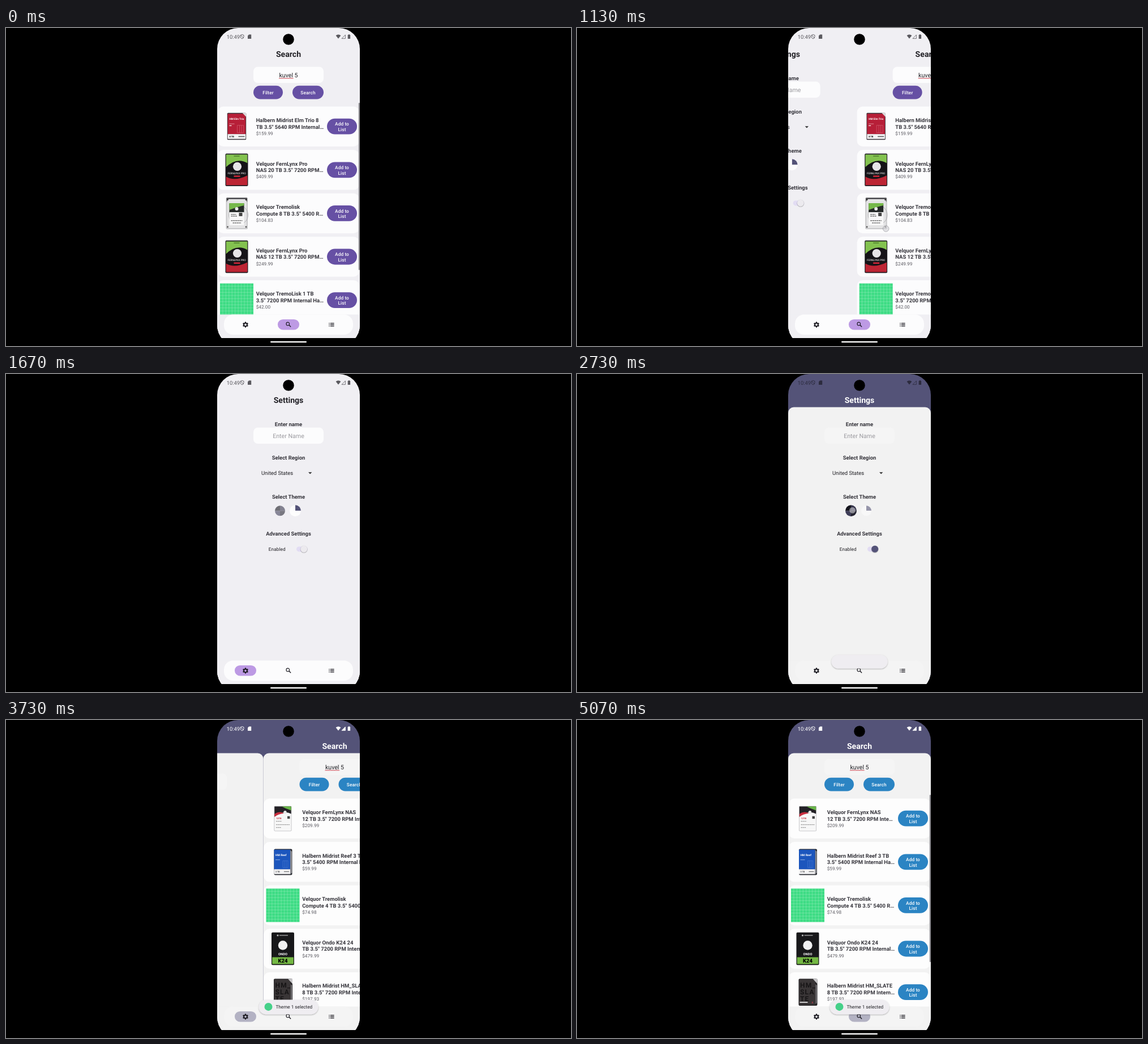
These frames come from a looping animation (998 by 561 pixels, 5.1 s). An HTML page:

```html
<!DOCTYPE html>
<html lang="en">
<head>
<meta charset="utf-8">
<title>Part list app</title>
<style>
html, body { margin: 0; width: 100%; height: 100%; overflow: hidden; background: #000; }
svg {
  display: block; width: 100vw; height: 100vh;
  font-family: Roboto, Arial, sans-serif; text-rendering: geometricPrecision;
  --bg: #f0eff3; --head: #f0eff3; --title: #232227; --field: #fcfcfd; --card: #fcfcfd;
  --accent: #6650a4; --pill: #bd9ae4; --nav: #fcfcfd; --thumb: #eceaee;
}
svg.alt {
  --bg: #f2f2f2; --head: #545378; --title: #fff; --field: #f5f5f5; --card: #fdfdfd;
  --accent: #2b84c3; --pill: #b3b2c3; --nav: #f4f4f4; --thumb: #545378;
}
.mid { text-anchor: middle; }
.title { font-weight: 700; fill: var(--title); }
.bold { font-weight: 700; fill: #35343b; }
.ink { fill: #1f1e23; }
.price { fill: #5d5c63; }
.hint { fill: #9b9a9f; }
.btn { font-weight: 500; fill: #fff; letter-spacing: .1px; }
.icon { fill: none; stroke: #1c1b22; }
.pie { transform: scale(.9); opacity: .58; }
svg:not(.alt) .pie.light, svg.alt .pie.dark { transform: none; opacity: 1; }
svg:not(.alt) .altOnly, svg.alt .baseOnly { display: none; }
</style>
</head>
<body>
<svg id="stage" viewBox="0 0 998 561"></svg>
<script>
const LOOP = 5100, PAGE = 252, THEME_AT = 2700;
const stage = document.getElementById('stage');

// markup helpers
const text = (x, y, str, size, cls, extra = '') =>
  `<text x="${x}" y="${y}" font-size="${size}" class="${cls}" ${extra}>${str}</text>`;
const rect = (x, y, w, h, r, fill, extra = '') =>
  `<rect x="${x}" y="${y}" width="${w}" height="${h}" rx="${r}" fill="${fill}" ${extra}/>`;
const disc = (x, y, r, fill, extra = '') =>
  `<circle cx="${x}" cy="${y}" r="${r}" fill="${fill}" ${extra}/>`;
const path = (d, fill, extra = '') => `<path d="${d}" fill="${fill}" ${extra}/>`;
const group = (x, y, body, extra = '') => `<g transform="translate(${x} ${y})" ${extra}>${body}</g>`;
const white = 'fill="#fff"';

// product pictures, drawn around their centre
const grid = () => {
  let d = '';
  for (let p = -24.6; p < 29; p += 5.46) d += `M${p} -29.5v59M-29.5 ${p}h59`;
  return rect(-29.5, -29.5, 59, 59, 0, '#3ddc84') +
    path(d, 'none', 'stroke="#fff" stroke-opacity=".42" stroke-width=".5"');
};
const redDrive = () =>
  rect(-16.7, -24, 33.4, 47.5, 1.5, '#39343a') +
  rect(-15.8, -22.5, 31.6, 36, .5, '#b71f38') +
  rect(-15.8, 13.5, 31.6, 8.5, 0, '#f4f3f4') +
  path('M10 -24h6.7v7z', '#ddd') +
  text(-13, -11.5, 'HM Elm Trio', 4.7, '', white + ' font-weight="700"') +
  rect(-13, -5, 9, .8, 0, '#e7a5ae') + rect(-13, -2, 4, 1.2, 0, '#fff') +
  path('M1 -2h11v13h-11zM5 -2v13M8.5 -2v13', 'none', 'stroke="#d86b7b" stroke-width=".6"') +
  text(-13, 19.5, '8 TB', 4, '', 'font-weight="700"') + rect(3, 17, 11, 1.5, 0, '#555');
const lynxDrive = () =>
  rect(-20, -28.7, 40, 57.5, 2, '#26252a') +
  rect(-18.8, -27, 37.6, 54, 1, '#151317') +
  path('M-18.8 -27h37.6v15Q0 -23 -18.8 -5z', '#83c24f') +
  path('M-18.8 12Q-4 21 18.8 10v17h-37.6z', '#bd2534') +
  rect(-5, -25, 10, 1.4, 0, '#4a792b') +
  disc(1, -6, 7.6, '#e6e4e7') +
  text(0, 7.5, 'FERNLYNX PRO', 4.6, 'mid', white) +
  rect(-5, 10, 11, 2.4, 0, '#d9273a');
const silverDrive = () =>
  rect(-19, -28, 38.5, 56, 2, '#c9c9cb') +
  rect(-18, -27.5, 36.5, 7, 1, '#4c4c50') +
  rect(-17, -25, 34.5, 51, 3, '#e4e4e5') +
  disc(3, 3, 17, 'none', 'stroke="#a5a5a8" stroke-width=".8"') +
  rect(-13, -18, 26, 17, 1, '#242827') +
  path('M-13 -18h26v4Q3 -12 -13 -6z', '#75b84a') +
  disc(0, -8, 3, '#e9e9e9') +
  rect(-13, -2, 26, 23, 0, '#f8f8f8') + rect(4, -1, 6, 6, 0, '#444') +
  path('M-10 2h9M-10 5h11M-10 13h20M-7 17h15', 'none', 'stroke="#555" stroke-width="1.2" stroke-dasharray="3 .7"') +
  [-16, 16.5].map(x => disc(x, -24, 1.4, '#333') + disc(x, 24, 1.4, '#555')).join('');
const nasDrive = () =>
  rect(-15.5, -22, 31, 44.5, 2, '#bdbdc0') + rect(-14.7, -21.3, 29.4, 43, 1, '#f7f7f7') +
  path('M-14.7 -21.3h29.4v13Q0 -15 -14.7 -3z', '#232126') +
  path('M-2 -21.3h16.7v7Q6 -17 -2 -21.3z', '#69b748') +
  path('M-14.7 -8Q-6 -14 2 -9Q-8 -8 -14.7 -3z', '#c92d3e') +
  disc(4, -11, 2.7, '#e8e8e8') +
  text(-12, 1, '12TB', 4, '', 'fill="#c32b3b" font-weight="700"') +
  rect(8, -4, 4.5, 4.5, 0, '#444') +
  path('M-12 5h10M-12 11h24M-12 16h9', 'none', 'stroke="#888" stroke-width="1" stroke-dasharray="2.5 .6"');
const blueDrive = () =>
  rect(-15.5, -22.7, 32, 46, 2, '#2b2d33') +
  path('M13 -21l3 3v37l-3 3z', '#88898e') +
  rect(-15.5, -21.5, 28.5, 35, .5, '#1c56bd') +
  rect(-15.5, 13, 28.5, 8.5, 0, '#f2f2f3') +
  text(-13, -10, 'HM Reef', 5, '', white + ' font-weight="700"') +
  rect(-13, -4, 8, .8, 0, '#a9c0ea') +
  path('M0 -2h9v12h-9zM3 -2v12M6 -2v12', 'none', 'stroke="#4c7dd3" stroke-width=".6"') +
  text(-13, 19, '3 TB', 3.8, '') + rect(2, 16.5, 9, 1.3, 0, '#777');
const ondoDrive = () =>
  rect(-20, -28.7, 40, 57.5, 2, '#18181a') +
  path('M-18.8 15h37.6v12h-37.6z', '#74b843') +
  disc(-9, -23.5, 1.6, '#bbb') + rect(-6, -24.2, 15, 1.3, 0, '#aaa') +
  disc(0, -6, 8.2, '#f1f1f1') +
  text(0, 11, 'ONDO', 5.8, 'mid', white + ' font-weight="700"') +
  text(0, 24.5, 'K24', 9.5, 'mid', 'font-weight="900"');
const slateDrive = () =>
  rect(-16, -23.5, 33, 47.5, 2, '#232123') + rect(-15, -22.5, 28.5, 45, 1, '#393536') +
  path('M9 -23.5h8v9z', '#c8c7c9') + path('M14 -14l2 2v31l-2 2z', '#7f7d80') +
  ['HM_', 'SLA', 'TE'].map((s, i) =>
    text(-13.5, -8 + i * 12, s, 12, '', 'fill="#171516" font-weight="700" letter-spacing="1.2"')).join('') +
  rect(-14, 17, 14, 1.8, 0, '#ddd') + text(7, 20, '8', 4.5, '', 'fill="#e0455a"');

const baseItems = [
  ['Halbern Midrist Elm Trio 8', 'TB 3.5" 5640 RPM Internal…', '$159.99', redDrive],
  ['Velquor FernLynx Pro', 'NAS 20 TB 3.5" 7200 RPM…', '$409.99', lynxDrive],
  ['Velquor Tremolisk', 'Compute 8 TB 3.5" 5400 R…', '$104.83', silverDrive],
  ['Velquor FernLynx Pro', 'NAS 12 TB 3.5" 7200 RPM…', '$249.99', lynxDrive],
  ['Velquor TremoLisk 1 TB', '3.5" 7200 RPM Internal Ha…', '$42.00', grid],
];
const altItems = [
  ['Velquor FernLynx NAS', '12 TB 3.5" 7200 RPM Inte…', '$209.99', nasDrive],
  ['Halbern Midrist Reef 3 TB', '3.5" 5400 RPM Internal Ha…', '$59.99', blueDrive],
  ['Velquor Tremolisk', 'Compute 4 TB 3.5" 5400 R…', '$74.98', grid],
  ['Velquor Ondo K24 24', 'TB 3.5" 7200 RPM Internal…', '$479.99', ondoDrive, true],
  ['Halbern Midrist HM_SLATE', '8 TB 3.5" 7200 RPM Intern…', '$197.93', slateDrive, true],
];

const card = ([line1, line2, price, picture, late], i) => group(0, 138.5 + 76.6 * i,
  rect(374, 0, 250, 70.5, 10, 'var(--card)') +
  group(407.5, 35.2, picture()) +
  (late ? group(407.5, 35.2, grid(), 'class="late"') : '') +
  text(441.7, 27.6, line1, 9.45, 'bold') + text(441.7, 39, line2, 9.45, 'bold') +
  text(441.7, 50.3, price, 8.27, 'price') +
  rect(567, 21.3, 53, 27.8, 13.9, 'var(--accent)') +
  text(593.5, 33.9, 'Add to', 8.27, 'btn mid') + text(593.5, 43.5, 'List', 8.27, 'btn mid'));

const panel = path('M373 68.5a10 10 0 0 1 10-10h232a10 10 0 0 1 10 10V561H373z', 'var(--bg)');
const field = y => rect(437, y, 124, 28.5, 8, 'var(--field)');
const button = (x, w, label) =>
  rect(x, 101.8, w, 23.6, 11.8, 'var(--accent)') + text(x + w / 2, 116.7, label, 8.27, 'btn mid');

const searchPage = panel +
  text(499, 50.8, 'Search', 14.1, 'title mid') + field(68.5) +
  text(499, 87.3, 'kuvel 5', 10.63, 'ink mid') + rect(482, 88.3, 25.6, 1, 0, '#c9404c') +
  button(437, 52, 'Filter') + button(506, 55, 'Search') +
  `<g class="baseOnly">${baseItems.map(card).join('')}</g>` +
  `<g class="altOnly">${altItems.map(card).join('')}</g>` +
  rect(622.7, 132, 2.3, 295, 1, '#8f8e93');

const pie = (x, cls, colors) => group(x, 241.3, `<g class="pie ${cls}">` + colors.map((c, i) =>
  path('M0 0V-10A10 10 0 0 1 10 0Z', c, `transform="rotate(${90 * i})"`)).join('') + '</g>');

const settingsPage = panel +
  text(499, 50.8, 'Settings', 14.1, 'title mid') +
  text(499, 91.6, 'Enter name', 9.45, 'bold mid') + field(94.5) +
  text(499, 113, 'Enter Name', 10.63, 'hint mid') +
  text(499, 150.5, 'Select Region', 9.45, 'bold mid') +
  text(451, 178.2, 'United States', 9.45, 'ink') +
  path('M534 173.3h6.4l-3.2 3.2z', '#333') +
  text(499, 220, 'Select Theme', 9.45, 'bold mid') +
  pie(484, 'dark', ['#35344c', '#23222f', '#3f3e58', '#14141c']) +
  pie(511, 'light', ['#545378', '#fdfdfd', '#fdfdfd', '#fdfdfd']) +
  text(499, 284.6, 'Advanced Settings', 9.45, 'bold mid') +
  text(463.7, 311.8, 'Enabled', 8.27, 'ink', 'letter-spacing=".1"') +
  rect(513, 304.4, 19.5, 9, 4.5, '#e2dcf3') +
  disc(526.2, 309.3, 6.5, '#000', 'opacity=".22"') + disc(526.2, 308.7, 6, 'var(--thumb)');

const statusBar = `<g id="status">` +
  text(389.8, 18.5, '10:49', 9.4, '') +
  path('M417 11.6l3 1.1v2.4q0 2.7-3 3.9q-3-1.2-3-3.9v-2.4zM414.4 12.4l5.2 5.6', 'none', 'stroke="currentColor" stroke-width=".9"') +
  path('M429.2 11.5h4v7.5h-6.2v-5.2z', 'currentColor') +
  path('M582.6 13.2Q587 9.7 591.4 13.2L587 18.8z', 'currentColor') +
  path('M593 18.6h6.4v-6.6z', 'none', 'id="signal" stroke="currentColor" stroke-width=".8"') +
  path('M605 11.3h1.8v.8h1.3v7h-4.4v-7h1.3z', 'currentColor') + '</g>';

const pill = (x, id) => group(x, 523.2, rect(-19, -9.3, 38, 18.6, 9.3, 'var(--pill)', `id="${id}"`));
const navBar = rect(373, 505.5, PAGE, 56, 0, 'var(--bg)') +
  rect(385, 505.5, 228, 35.5, 16, 'var(--nav)') +
  pill(423, 'gearPill') + pill(499, 'searchPill') +
  group(423, 523.4, '<circle r="2.9" stroke-width="2.1"/>' +
    '<circle r="4.2" stroke-width="1.7" pathLength="12" stroke-dasharray="1 1" stroke-dashoffset="-.5"/>', 'class="icon"') +
  group(499, 523, '<circle cx="-1.2" cy="-1.1" r="2.8" stroke-width="1.1"/><path d="M.9 1l3.2 3.2" stroke-width="1.4"/>', 'class="icon"') +
  group(575, 523.3, '<path d="M-4.7 -2.5h1.3M-4.7 0h1.3M-4.7 2.5h1.3M-2.2 -2.5h6.8M-2.2 0h6.8M-2.2 2.5h6.8" stroke-width="1.2"/>', 'class="icon"');

const toast = group(499, 506.4, '<g id="toast">' +
  rect(-52.4, -12.8, 104.8, 25.6, 12.8, '#efedf1', 'filter="url(#shadow)"') +
  '<g id="toastBody">' + disc(-35.5, -.5, 7, '#45d089') +
  text(-22.6, 2.6, 'Theme 1 selected', 8.2, 'ink') + '</g></g>');

stage.innerHTML = `<defs>
  <clipPath id="screen"><rect x="373" y="0" width="252" height="561" rx="37"/></clipPath>
  <filter id="shadow" x="-10%" y="-30%" width="120%" height="170%">
    <feDropShadow dx="0" dy="1" stdDeviation="1.1" flood-opacity=".32"/></filter></defs>` +
  rect(0, 0, 998, 561, 0, '#000') +
  '<g clip-path="url(#screen)">' + rect(373, 0, PAGE, 561, 0, 'var(--head)') +
  `<g id="settings">${settingsPage}</g><g id="search">${searchPage}</g>` +
  navBar + statusBar + toast + '</g>' +
  rect(373, 547, PAGE, 14, 0, '#000') + rect(467, 552.4, 64, 2.6, 1.3, '#f4f4f4') +
  disc(499, 20, 9.8, '#000') +
  disc(0, 0, 5.3, '#d2d2d7', 'id="touch" fill-opacity=".6" stroke="#77777c" stroke-opacity=".6" stroke-width=".8"');

const el = {};
stage.querySelectorAll('[id]').forEach(n => el[n.id] = n);
const late = stage.querySelectorAll('.late');

// motion
const ramp = (t, a, b) => Math.min(1, Math.max(0, (t - a) / (b - a)));
const easeOut = u => 1 - (1 - u) ** 2;
const along = (t, points) => {
  let v = points[0][1];
  for (let i = 1; i < points.length; i++) {
    const [a, from] = points[i - 1], [b, to] = points[i];
    if (t >= a) v = from + (to - from) * ramp(t, a, b);
  }
  return v;
};
const firstDrag = [[570, 0], [800, 18], [1000, 56], [1070, 82], [1130, 120], [1160, 140]];
const secondDrag = [[3500, 0], [3540, 2], [3570, 9.5], [3600, 30], [3640, 70]];

// how far the search page sits to the right of its resting place
function pageShift(t) {
  if (t < 1160) return along(t, firstDrag);
  if (t < 3500) return 140 + (PAGE - 140) * easeOut(ramp(t, 1160, 1460));
  if (t < 3640) return PAGE - along(t, secondDrag);
  return (PAGE - 70) * (1 - easeOut(ramp(t, 3640, 3915)));
}

function touchPoint(t, shift) {
  if (t >= 570 && t < 1180) return [425 + shift, 354];
  if (t >= 2570 && t < 2770) return [486.5, 240.5];
  if (t >= 3480 && t < 3645) return [520.5 - (PAGE - shift), 279];
  return null;
}

function setPill(node, k) {
  node.setAttribute('opacity', k);
  node.setAttribute('transform', `scale(${.4 + .6 * easeOut(k)} 1)`);
}

function draw(t) {
  const alt = t >= THEME_AT, shift = pageShift(t);
  stage.classList.toggle('alt', alt);
  el.search.setAttribute('transform', `translate(${shift} 0)`);
  el.settings.setAttribute('transform', `translate(${shift - PAGE} 0)`);
  late.forEach(n => n.setAttribute('opacity', t < 3690 ? 1 : 0));

  const fade = ramp(t, 2740, 2900);
  const tint = alt ? `rgb(${[44, 43, 62].map(c => c + (255 - c) * fade)})` : '#5a595e';
  el.status.setAttribute('color', tint);
  el.status.setAttribute('fill', tint);
  el.signal.setAttribute('fill', t >= 3600 ? 'currentColor' : 'none');

  setPill(el.gearPill, t < THEME_AT ? ramp(t, 1460, 1600)
    : t < 3915 ? ramp(t, 2760, 2900) : 1 - ramp(t, 3915, 4000));
  setPill(el.searchPill, t < THEME_AT ? 1 - ramp(t, 1460, 1540) : ramp(t, 3915, 4055));

  const rise = ramp(t, THEME_AT, 2800);
  el.toast.setAttribute('opacity', alt ? Math.min(1, .5 + rise * 1.7) : 0);
  el.toast.setAttribute('transform', `translate(0 ${1.6 * (1 - rise)}) scale(${.92 + .08 * rise})`);
  el.toastBody.setAttribute('opacity', ramp(t, 2745, 2850));

  const touch = touchPoint(t, shift);
  el.touch.setAttribute('opacity', touch ? 1 : 0);
  if (touch) el.touch.setAttribute('transform', `translate(${touch})`);
}

function tick() {
  draw(performance.now() % LOOP);
  requestAnimationFrame(tick);
}
tick();
</script>
</body>
</html>
```
